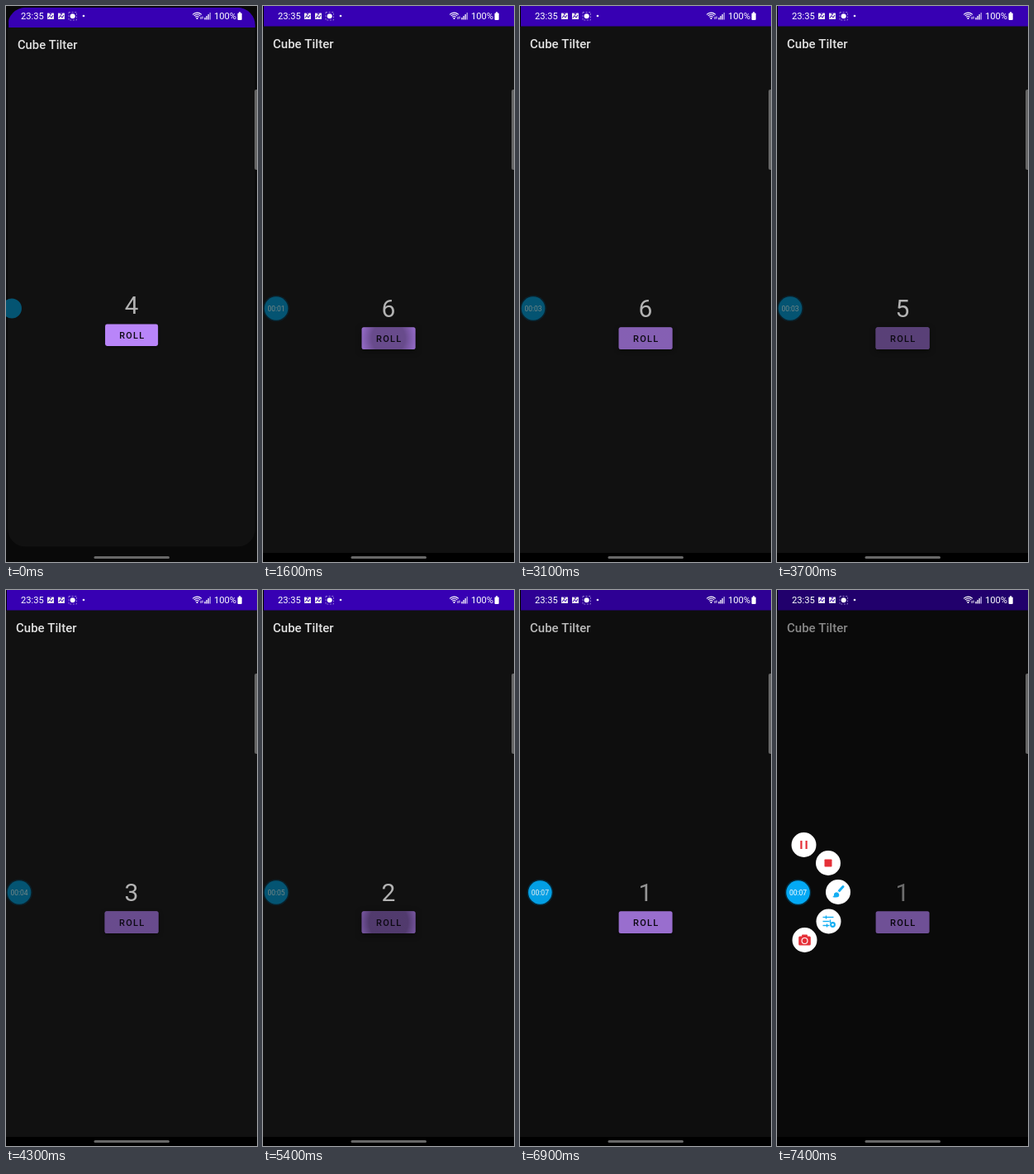
An HTML page with a canvas for the animation above (7800 ms loop, 304x672 px).

```html
<!DOCTYPE html>
<html lang="en">
<head>
<meta charset="utf-8">
<title>Cube Tilter</title>
<style>
html, body { margin: 0; width: 100%; height: 100%; overflow: hidden; background: #000; }
canvas { display: block; width: 304px; height: 672px; }
</style>
</head>
<body>
<canvas id="stage" width="304" height="672"></canvas>
<script>
const c = document.getElementById('stage').getContext('2d');
const LOOP = 7800;
const FONT = 'Roboto, sans-serif';
const BUTTON = [119.6, 388.2, 65, 26.7];
// touch down, start of fade, number rolled
const presses = [
  [1501, 1720, 6], [2350, 2913, 6], [3450, 3650, 5], [4000, 4200, 3],
  [4620, 4820, 4], [5265, 5465, 2], [5710, 5910, 1]
];
const ticks = [950, 1950, 2880, 3950, 5050, 5950, 6900];

const clamp = v => Math.max(0, Math.min(1, v));
const mix = (a, b, p) => a + (b - a) * p;
const span = (t, from, to) => clamp((t - from) / (to - from));
const easeOut = p => 1 - (1 - p) ** 3;

function rect(x, y, w, h, color, r = 0) {
  c.fillStyle = color;
  c.beginPath();
  c.roundRect(x, y, w, h, r);
  c.fill();
}

function disc(x, y, r, color) {
  c.fillStyle = color;
  c.beginPath();
  c.arc(x, y, r, 0, 7);
  c.fill();
}

function line(color, width, ...points) {
  c.strokeStyle = color;
  c.lineWidth = width;
  c.beginPath();
  points.forEach(([x, y], i) => i ? c.lineTo(x, y) : c.moveTo(x, y));
  c.stroke();
}

function text(str, x, y, size, color, align = 'left', weight = 400, spacing = 0) {
  c.font = `${weight} ${size}px ${FONT}`;
  c.letterSpacing = spacing + 'px';
  c.textAlign = align;
  c.fillStyle = color;
  c.fillText(str, x, y);
}

function button(t, press) {
  const age = press ? t - press[0] : 1e4;
  const fade = press ? 1 - span(t, press[1], press[1] + 350) : 0;
  const dark = 0.61 * span(age, -30, 150) * fade;

  c.save();
  c.shadowColor = 'rgba(0,0,0,.5)';
  c.shadowBlur = 3 + 4 * fade;
  c.shadowOffsetY = 1 + fade;
  rect(...BUTTON, '#b985f9', 2.5);
  c.restore();

  if (dark > 0) {
    // the ripple's soft edge runs past the corners as it grows
    const r = mix(20, 110, span(age, 0, 450));
    const g = c.createRadialGradient(152, 401.5, 0, 152, 401.5, r);
    g.addColorStop(0, `rgba(0,0,0,${dark})`);
    g.addColorStop(0.5, `rgba(0,0,0,${dark})`);
    g.addColorStop(1, `rgba(0,0,0,${dark * 0.2})`);
    rect(...BUTTON, g, 2.5);
  }
  text('ROLL', 137, 406, 11, '#0c0912', 'left', 500, 1.3);
}

function app(t) {
  const open = easeOut(span(t, 60, 450));
  const s = mix(0.986, 1, open);
  const press = presses.filter(p => p[0] <= t).pop();
  c.save();
  c.translate(152 * (1 - s), 1.8 * (1 - open));
  c.scale(s, s);
  c.beginPath();
  c.roundRect(0, 0, 304, 661, 22 * (1 - open));
  c.clip();
  rect(0, 0, 304, 661, '#111');
  rect(0, 0, 1, 25, '#000');
  rect(1, 0, 303, 24.6, '#3700b3');
  text('Cube Tilter', 12, 51, 15, '#e2e2e2', 'left', 500);
  text(press ? press[2] : 4, 152, 375.5, 30, '#b3b3b3', 'center');
  button(t, press);
  c.restore();
}

function statusBar() {
  const w = '#fff';
  text('23:35', 18, 16, 11.2, w);
  for (const x of [50, 63]) {
    rect(x, 8.5, 8, 7.5, '#eee', 0.5);
    line('#3700b3', 1, [x + 1, 14.5], [x + 3, 11.5], [x + 5, 14], [x + 7, 11]);
    line('#3700b3', 0.9, [x + 2.5, 8], [x + 4, 10.5], [x + 5, 8]);
  }
  c.setLineDash([2, 1.6]);
  c.strokeStyle = '#a894dd';
  c.lineWidth = 0.8;
  c.strokeRect(76, 7.5, 9.5, 9.5);
  c.setLineDash([]);
  disc(80.7, 12.2, 3, w);
  disc(94, 12, 1.3, w);

  c.strokeStyle = w;
  c.lineWidth = 1.1;
  for (const r of [3, 5.2, 7.4]) {
    c.beginPath();
    c.arc(231.5, 15.5, r, -Math.PI * 0.76, -Math.PI * 0.24);
    c.stroke();
  }
  disc(231.5, 15, 1.1, w);
  line(w, 0.9, [236, 13], [236, 16]);
  line(w, 0.9, [238, 12.5], [238, 15.5]);
  for (let i = 0; i < 4; i++) rect(240.3 + i * 2.1, 14 - i * 2, 1.3, 2.5 + i * 2, i < 3 ? w : '#b9a6e6');
  text('100%', 252, 16, 11.2, w);
  rect(280.5, 8.5, 5.2, 8.5, w, 1);
  rect(282, 7.3, 2.2, 1.5, w);
}

const RED = '#e53038', BLUE = '#14aef2';
const items = [
  [32.5, 308, () => {
    rect(-4.2, -5, 2.2, 10, RED);
    rect(2, -5, 2.2, 10, RED);
  }],
  [62, 330, () => rect(-4.5, -4.5, 9, 9, RED, 0.8)],
  [74, 365, () => {
    c.lineCap = 'round';
    line(BLUE, 3, [1, -1], [6, -6.5]);
    c.lineCap = 'butt';
    line('#fff', 0.8, [-1, -2], [3, 2]);
    c.fillStyle = BLUE;
    c.beginPath();
    c.moveTo(-7, 6);
    c.quadraticCurveTo(-4.5, 5, -5, 2);
    c.quadraticCurveTo(-2, -1.5, 1, 2);
    c.quadraticCurveTo(3, 8, -7, 6);
    c.fill();
  }],
  [62.5, 400.5, () => {
    [[-5, -3], [0, 2], [5, -2]].forEach(([y, x], i) => {
      line(BLUE, 1.4, [-7, y], [i ? 1 : 6, y]);
      line(BLUE, 1.4, [x, y - 2], [x, y + 2]);
    });
    disc(5, 4, 3.4, BLUE);
    disc(5, 4, 1.3, '#fff');
  }],
  [33.5, 423, () => {
    rect(-7.3, -4.5, 14.6, 11, RED, 1.5);
    rect(-3.5, -6.5, 7, 3, RED, 1);
    disc(0, 1, 4, '#fff');
    disc(0, 1, 2.9, RED);
  }]
];

function recorder(t) {
  const enter = easeOut(span(t, 60, 450));
  const wake = easeOut(span(t, 6750, 7050));
  const fan = easeOut(span(t, 6900, 7380));
  const x = mix(mix(7, 16, enter), 25.5, wake);
  const y = 365.5;
  const r = mix(12, 14.3, enter);

  if (fan > 0) {
    for (const [ix, iy, icon] of items) {
      c.save();
      c.globalAlpha = clamp(fan * 1.5);
      c.translate(mix(x, ix, fan), mix(y, iy, fan));
      c.scale(mix(0.3, 1, fan), mix(0.3, 1, fan));
      disc(0, 0, 15, '#fff');
      icon();
      c.restore();
    }
  }
  disc(x, y, r + 1.5, `rgba(4,48,68,${mix(0.5, 0.9, wake) * enter})`);
  const color = [[4, 3], [84, 169], [114, 244]].map(([a, b]) => Math.round(mix(a, b, wake)));
  disc(x, y, r, `rgb(${color})`);
  const sec = ticks.filter(k => k <= t).length;
  const shade = Math.round(mix(135, 255, wake));
  c.globalAlpha = span(t, 150, 400);
  text('00:0' + sec, x, y + 3.1, 8.5, `rgb(${shade - 20 * (1 - wake)},${shade},${shade})`, 'center');
  c.globalAlpha = 1;
}

function draw(t) {
  const back = Math.round(9 * (1 - span(t, 60, 450)));
  rect(0, 0, 304, 672, `rgb(${back},${back},${back})`);
  app(t);
  rect(0, 0, 304, 672, `rgba(0,0,0,${0.4 * span(t, 6750, 7100)})`);
  statusBar();
  rect(301, 101, 5, 97, '#656565', 2);
  rect(106.5, 665, 91.5, 3, '#686868', 1.5);
  recorder(t);
}

function loop() {
  draw(performance.now() % LOOP);
  requestAnimationFrame(loop);
}
loop();
</script>
</body>
</html>
```
